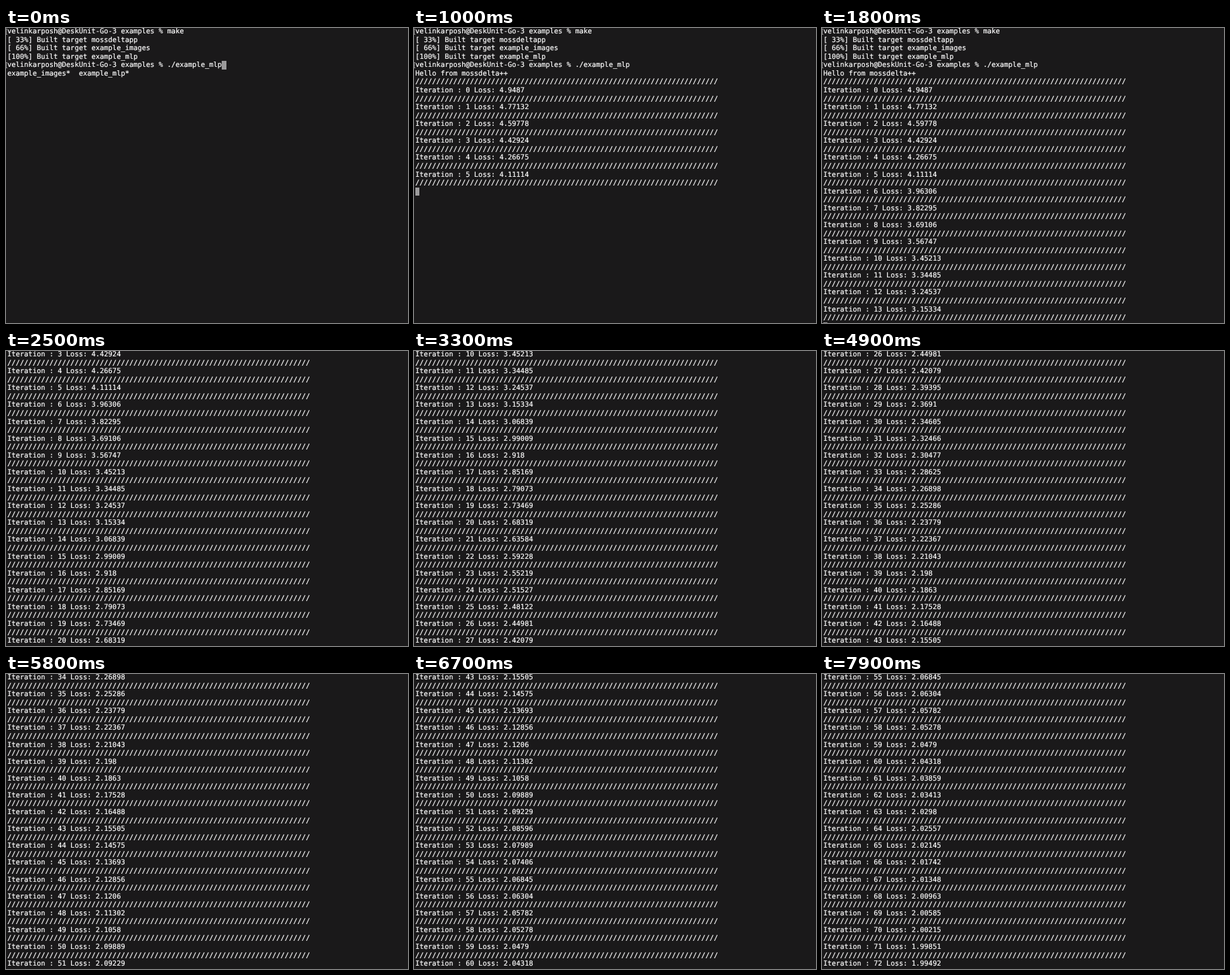
An HTML page for the animation above (8 s loop, 600 by 440 pixels).

```html
<!DOCTYPE html>
<html lang="en">
<head>
<meta charset="utf-8">
<title>Training log</title>
<style>
  html, body { margin: 0; width: 100%; height: 100%; overflow: hidden; background: #1a191a; }
  #stage { position: relative; width: 600px; height: 440px; overflow: hidden; }
  #log {
    position: absolute; left: 2px; top: -1px; margin: 0;
    font: 10.43px/12.57px "DejaVu Sans Mono", monospace;
    font-variant-ligatures: none;
    text-rendering: geometricPrecision;
    color: #fff;
    -webkit-text-stroke: 0.2px #fff;
  }
  #cursor { position: absolute; width: 6.3px; height: 12.57px; background: #9b9a9b; }
  .mark {
    position: absolute; left: 0; width: 2px; height: 9px; box-sizing: border-box;
    border: 1px solid #8a898a; border-right: 0;
  }
</style>
</head>
<body>
<div id="stage">
  <div id="cursor"></div>
  <pre id="log"></pre>
  <div class="mark"></div>
  <div class="mark"></div>
</div>
<script>
const LOOP = 8000, STEP = 100;
const ROW = 12.57, COL = 6.28, LEFT = 2, TOP = -1;
const LAST_ROW = 36;          // the terminal runs slightly below the visible stage
const PROMPT_ROWS = [0, 4];
const PAUSES = [26, 50];      // steps during which no new iteration is printed

const PROMPT = 'velinkarposh@DeskUnit-Go-3 examples % ';
const COMMAND = PROMPT + './example_mlp';
const RULE = '/'.repeat(72);
const HEADER = [
  PROMPT + 'make',
  '[ 33%] Built target mossdeltapp',
  '[ 66%] Built target example_images',
  '[100%] Built target example_mlp',
  COMMAND
];

// Key points of the loss curve, spaced like Chebyshev nodes.
const LOSS_KEYS = [
  [0, 4.9487], [1, 4.77132], [4, 4.26675], [8, 3.69106], [14, 3.06839],
  [20, 2.68319], [28, 2.39395], [36, 2.23779], [44, 2.14575], [52, 2.08596],
  [58, 2.05278], [64, 2.02557], [68, 2.00963], [71, 1.99851], [72, 1.99492]
];

// Lagrange interpolation, printed with six significant digits.
function lossAt(n) {
  const loss = LOSS_KEYS.reduce((sum, [x, y]) =>
    sum + LOSS_KEYS.reduce((term, [other]) =>
      other === x ? term : term * (n - other) / (x - other), y), 0);
  return Number(loss.toPrecision(6));
}

const log = document.getElementById('log');
const cursor = document.getElementById('cursor');
const marks = document.querySelectorAll('.mark');

function terminalAt(step) {
  if (step === 0) {
    return {
      lines: [...HEADER, 'example_images*  example_mlp*'],
      row: 4,
      col: COMMAND.length
    };
  }
  const lines = [...HEADER];
  if (step >= 4) {
    const count = step - 4 - PAUSES.filter(pause => step >= pause).length;
    lines.push('Hello from mossdelta++', RULE);
    for (let i = 0; i < count; i++) {
      lines.push(`Iteration : ${i} Loss: ${lossAt(i)}`, RULE);
    }
  }
  return { lines, row: lines.length, col: 0 };
}

function render(step) {
  const { lines, row, col } = terminalAt(step);
  const scroll = Math.max(0, row - LAST_ROW);
  const rowTop = r => TOP + (r - scroll) * ROW;

  log.textContent = lines.slice(scroll).join('\n');
  cursor.style.left = LEFT + col * COL + 'px';
  cursor.style.top = rowTop(row) + 'px';
  marks.forEach((mark, i) => {
    mark.style.top = rowTop(PROMPT_ROWS[i]) + 2 + 'px';
  });
}

let shown = -1;
function tick() {
  const step = Math.floor(performance.now() % LOOP / STEP);
  if (step !== shown) render(shown = step);
  requestAnimationFrame(tick);
}
tick();
</script>
</body>
</html>
```
